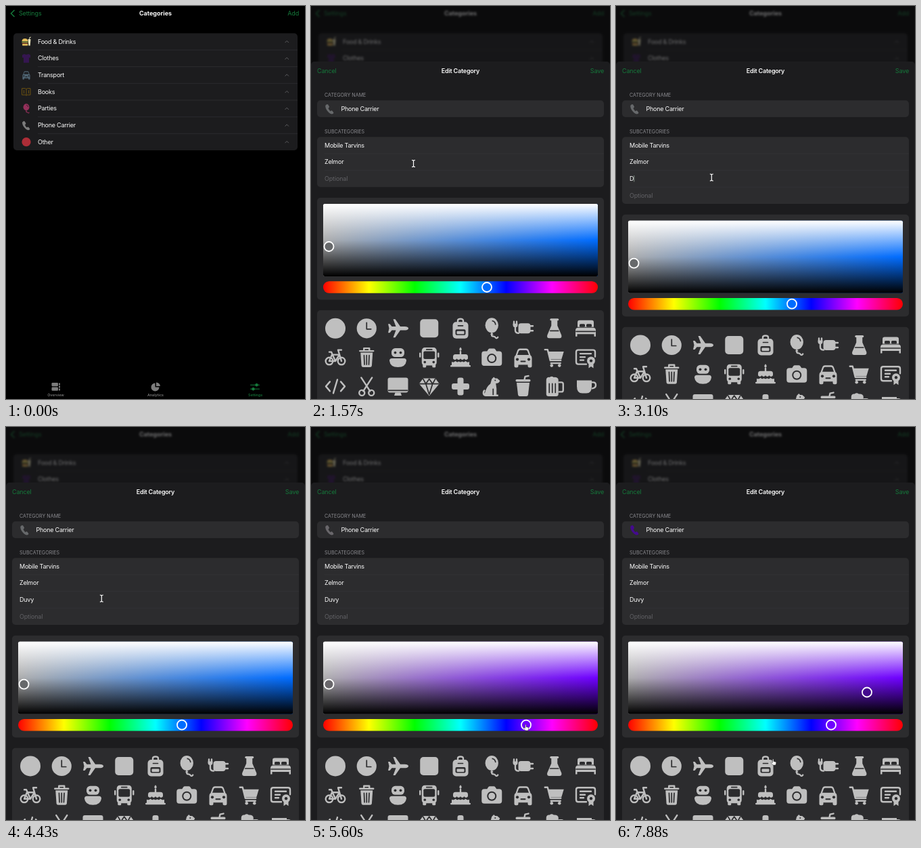
Write an HTML page that moves like this. It is 442 px wide and 580 px high and loops after 8000 ms.

```html
<!DOCTYPE html>
<html lang="en">
<head>
<meta charset="utf-8">
<title>Edit Category</title>
<style>
  html, body { margin: 0; width: 100%; height: 100%; overflow: hidden; background: #000; }
  svg { position: absolute; inset: 0; width: 100%; height: 100%; display: block; }
  text { font: 400 9px Inter, sans-serif; letter-spacing: -.24px; fill: #fafafa; }
  .title { font-weight: 700; letter-spacing: 0; }
  .sheetTitle { font-weight: 600; letter-spacing: -.22px; }
  .link { letter-spacing: -.15px; fill: #15793b; }
  .label { font-size: 7.1px; letter-spacing: .03px; fill: #8c8c91; }
  .hint { letter-spacing: -.15px; fill: #616165; }
  .tab { font-size: 5.4px; font-weight: 500; letter-spacing: 0; fill: #858585; }
  .active { fill: #15793b; }
  .mid { text-anchor: middle; }
  .end { text-anchor: end; }
  .icon { fill: currentColor; }
  .icon .cut { fill: var(--bg); }
  .line, .cutLine { fill: none; stroke-linecap: round; stroke-linejoin: round; }
  .icon .line { stroke: currentColor; stroke-width: 2.4; }
  .icon .cutLine { stroke: var(--bg); stroke-width: 1.7; }
  .thin .line { stroke-width: 1; }
  .knob { stroke: #fff; stroke-width: 1.8; }
</style>
</head>
<body>
<svg id="page" viewBox="0 0 442 580"></svg>
<svg id="front" viewBox="0 0 442 580"></svg>
<script>
const $ = id => document.getElementById(id);
const text = (x, y, str, cls = '') => `<text x="${x}" y="${y}" class="${cls}">${str}</text>`;
const path = (d, cls = '') => `<path d="${d}" class="${cls}"/>`;
const line = d => path(d, 'line');
const cutLine = d => path(d, 'cutLine');
const rect = (x, y, w, h, r = 0, cls = '') => `<rect x="${x}" y="${y}" width="${w}" height="${h}" rx="${r}" class="${cls}"/>`;
const dot = (x, y, r, cls = '', id = '') => `<circle id="${id}" cx="${x}" cy="${y}" r="${r}" class="${cls}"/>`;
const box = (x, y, w, h, fill, id = '') => `<rect id="${id}" x="${x}" y="${y}" width="${w}" height="${h}" rx="5" fill="${fill}"/>`;
const icon = (art, x, y, color, scale = 1, bg = '#2c2c2e') =>
  `<g class="icon" transform="translate(${x} ${y}) scale(${scale})" style="color:${color};--bg:${bg}">${art}</g>`;

const ROW = 24.68;
const CARD = '#2c2c2e', LIST_CARD = '#1c1c1e', GRAY = '#bfbfbf', TAB = '#7d7d7d', GREEN = '#15793b';

const phone = path('M-4.6-5.6q1.3-1.2 2.3 0l1.5 2.4q.5 1-.4 1.8l-.8.9q1 2.4 2.8 3.8l1-.6q1-.5 1.7.3l1.6 2q.6 1-.6 1.8-2.2 1.3-5.3-1.2-4.6-4-5.2-9 0-1.6 1.4-2.2z');
const car = path('M-13 13V1q0-3 2-4l2.5-7q1-3 4-3h9q3 0 4 3l2.5 7q2 1 2 4v12q0 2-2 2h-2q-2 0-2-2v-2h-14v2q0 2-2 2h-2q-2 0-2-2z')
  + path('M-8.5-3.5l2-5.5q.5-1.5 2-1.5h9q1.5 0 2 1.5l2 5.5z', 'cut')
  + dot(-8.5, 3, 2.1, 'cut') + dot(8.5, 3, 2.1, 'cut') + rect(-4, 5, 8, 2, 1, 'cut');
const balloon = '<ellipse cy="-4.5" rx="9.7" ry="11"/>' + path('M-2.5 9L0 5.5 2.5 9z')
  + line('M0 9c-1 4 4 2 5 4s3 2 4 0') + cutLine('M1-11q4 1 4.5 5');
const shirt = path('M-6-5l3-1.5q3 2 6 0L6-5v4H4v7.5h-8V-1h-2z');
const book = '<g class="thin">' + line('M-6-5h4.5L0-4l1.5-1H6V4.5H1.5L0 5.5l-1.5-1H-6zM0-4v9M-3.5-2v4M3.5-2v4') + '</g>';
const food = '<g fill="#e4bd5a">' + path('M-6.5-.5q.3-4 4.5-4t4.5 4z') + rect(-6, 3.5, 8.5, 2.5, 1) + '</g>'
  + '<g fill="#8a4f2c">' + rect(-6.5, 1.5, 9, 1.6, .8) + '</g><g fill="#8fae46">' + rect(-6.7, 0, 9.4, 1.2, .5)
  + '</g><g fill="#e8e2b8">' + path('M2.5-3.5h4L5.7 6H3.5z') + path('M4-4l.8-2.5 2-.5v1l-1.3.3L5-3.5z') + '</g>';

const icons = [
  dot(0, 0, 15),
  dot(0, 0, 14.6) + cutLine('M0-8.5V1H6.5'),
  path('M15.5 0c0 2-3 2.8-6 2.8H3.5L-4 13.5h-3L-3 2.8h-6l-3 3.7h-2.5L-13 0l-1.5-6.5h2.5l3 3.7h6L-7-13.5h3L3.5-2.8h6c3 0 6 .8 6 2.8z'),
  rect(-13.5, -13.5, 27, 27, 5),
  rect(-11.5, -9.5, 23, 24.5, 5) + line('M-4-9v-2.5q0-2.5 4-2.5t4 2.5V-9') + cutLine('M-3.5-4h7') + rect(-7.5, 1.5, 15, 8.5, 2, 'cut') + rect(-5.5, 4, 11, 4.5, 1),
  balloon,
  rect(-7, -7.5, 18, 15, 4) + line('M11-3.5h3.5M11 3.5h3.5M-13.5-10v3.5M-9.5-10v3.5M-11.5-3V3q0 4 5 4') + path('M-15-7h7v2q0 3.5-3.5 3.5T-15-5z'),
  rect(-6.5, -14.5, 13, 3, 1.5) + path('M-4.5-12V-4l-6 14q-1 4.5 3 4.5h15q4 0 3-4.5l-6-14v-8z') + cutLine('M-6 3.5H6'),
  path('M-12-2v-7q0-3 3-3H9q3 0 3 3v7z') + rect(-9, -6.5, 8, 4.5, 1.5, 'cut') + rect(1, -6.5, 8, 4.5, 1.5, 'cut') + path('M-15 12V3q0-4 4-4h22q4 0 4 4v9h-2.5V8.5h-25V12z') + cutLine('M-14 4.5h28'),
  dot(-9, 5.5, 5.3, 'line') + dot(9, 5.5, 5.3, 'line') + line('M-9 5.5L-5-4H6L0 5.5h-9M0 5.5L-6-8h-3M9 5.5L4-11h5'),
  line('M-10-9.5h20M-4-10v-3.5h8v3.5') + path('M-9-7H9L7.7 12q-.2 2.5-2.7 2.5h-10q-2.5 0-2.7-2.5z') + cutLine('M-3.8-3l.6 13.500M0-3v13.500M3.800-3l-.6 13.500'),
  rect(-9.5, -13.5, 19, 13, 5.5) + dot(-4, -7, 1.9, 'cut') + dot(4, -7, 1.9, 'cut') + path('M-12.5 5q0-3.5 3.5-3.5H9q3.5 0 3.5 3.5-1 9.5-12.5 9.5T-12.5 5z'),
  rect(-11, -14.5, 22, 26.5, 4.5) + rect(-8.5, -9, 17, 11.5, 2, 'cut') + cutLine('M-4-11.7h8') + dot(-6.5, 7, 1.8, 'cut') + dot(6.5, 7, 1.8, 'cut') + rect(-9.5, 10, 5, 5, 1.5) + rect(4.5, 10, 5, 5, 1.5) + line('M-13.5-6v5M13.5-6v5'),
  line('M0-8.5v4') + path('M0-15q3.5 4 0 5.5-3.5-1.5 0-5.5z') + path('M-11 2v-3q0-3.5 3.5-3.5h15Q11-4.5 11-1v3q-3 3.5-5.5 0-2.8 3.5-5.5 0-2.8 3.5-5.5 0-2.5 3.5-5.5 0z') + path('M-13 12V6.5q3 1.5 5.5-1 2.5 2.5 5 .5Q0 8 2.5 6q2.5 2 5-.5 2.5 2.5 5.5 1V12z') + rect(-15, 11.5, 30, 2.5, 1.2),
  path('M-11-9h4l2-3q.8-1 2-1h6q1.2 0 2 1l2 3h4q4 0 4 4V8.5q0 4-4 4h-22q-4 0-4-4V-5q0-4 4-4z') + dot(0, 1.5, 7, 'cut') + dot(0, 1.5, 5),
  car,
  line('M-14-11.5h4L-6 4.5H9.5M-5 8.5H9') + path('M-9.5-8.5h23.5L10.5 3H-6.5z') + dot(-4, 12, 2.3) + dot(7.5, 12, 2.3),
  line('M1 10h-12q-3 0-3-3V-8q0-3 3-3h22q3 0 3 3v7M-8-5.5H8M-8-.5h7M-8 4h5') + dot(8, 5, 6) + path('M4.5 9.5h7V16L8 13.5 4.5 16z') + dot(8, 5, 2.2, 'cut'),
  line('M-8-7l-6 7 6 7M8-7l6 7-6 7M3-10L-3 10'),
  line('M-8-13L5 7M8-13L-5 7') + dot(-7, 9.5, 4, 'line') + dot(7, 9.5, 4, 'line'),
  rect(-15, -13, 30, 22, 3) + cutLine('M-14 6h28') + path('M-4 9h8l1.5 4.5h-11z'),
  path('M-9-12H9l6 8L0 14-15-4z') + cutLine('M-14-3.8h28M-5-3.8L0 12 5-3.8 0-11-5-3.8M-9-11l4 7.2M9-11L5-3.8'),
  path('M-4.5-10q0-3 3-3h3q3 0 3 3v5.5H10q3 0 3 3v3q0 3-3 3H4.5V10q0 3-3 3h-3q-3 0-3-3V4.5H-10q-3 0-3-3v-3q0-3 3-3h5.5z'),
  path('M0-11l3-3 2 2h3l4 3.5q-1 4-6 4L7 3v9h2.5v2.5H-9q-4 0-4.5-4t2.5-6l1.500 1.500q-2 2-1 4.500Q-8 0-2-4z') + dot(5, -9, 1, 'cut') + cutLine('M2 4v8'),
  line('M2-10l1-4.5 5-1') + rect(-11, -10.5, 22, 3.5, 1.7) + path('M-9.5-5.5h19l-2 17.5q-.3 2.5-2.8 2.5h-9.4q-2.5 0-2.8-2.5z'),
  path('M-12-9q0-5 5-4.5 3-2.5 6 0 7-.5 7 4.5V11q0 3.5-3.5 3.5h-11Q-12 14.500-12 11z') + line('M7-6h3.5Q13-6 13-3.500v9Q13 8 10.500 8H7') + cutLine('M-7.5-4v13M-3-4v13M1.5-4v13'),
  path('M-13-9H9v9q0 10-8 10h-6q-8 0-8-10z') + line('M9-6h2q4 0 4 4t-5 5')
];

const categories = [
  ['Food &amp; Drinks', food, '#fff', 1], ['Clothes', shirt, '#351650', 1], ['Transport', car, '#4d6270', .43],
  ['Books', book, '#6d5210', 1], ['Parties', balloon, '#94305a', .46], ['Phone Carrier', phone, '#7c7c7c', 1],
  ['Other', icons[0], '#ad2d37', .44]
];

const listRows = categories.map(([name, art, color, scale], i) => {
  const y = 52.6 + ROW * i;
  return icon(art, 30, y, color, scale, LIST_CARD) + text(47, y + 3.1, name)
    + `<path d="M412.5 ${y + 1.5}l2.7-2.7 2.7 2.7" fill="none" stroke="#5c5c60"/>`
    + (i ? `<path d="M47 ${y - ROW / 2}H431" stroke="#323235" stroke-width=".7"/>` : '');
}).join('');

const overview = [-5.5, -1.5, 2.5].map(y => rect(4.5, y, 2, 3, .5)).join('')
  + rect(-6, -6, 9.5, 5.3, 1.2) + rect(-6, .5, 9.5, 5.3, 1.2);
const pie = path('M-.5-5.5V.5H5.5A6 6 0 1 1-.5-5.5z') + path('M1-6.5A6 6 0 0 1 7-1H1z');
const sliders = '<g class="thin">' + line('M-6.5-2.7h13M-6.5 3.2h13') + '</g>' + dot(2.5, -2.7, 2.2) + dot(-2.5, 3.2, 2.2);

$('page').innerHTML = `
  <rect width="442" height="580"/>
  <path d="M12.5 6L7.5 11l5 5" fill="none" stroke="${GREEN}" stroke-width="1.5"/>
  ${text(19, 14.4, 'Settings', 'link')}${text(221, 14.4, 'Categories', 'title mid')}${text(433, 14.4, 'Add', 'link end')}
  ${box(11, 40.3, 420, ROW * 7, LIST_CARD)}
  <rect id="press" x="11" y="${40.3 + 5 * ROW}" width="420" height="${ROW}" fill="#3a3a3c"/>
  ${listRows}
  ${icon(overview, 73.5, 562, TAB)}${text(73.5, 575.8, 'Overview', 'tab mid')}
  ${icon(pie, 221, 562, TAB)}${text(221, 575.8, 'Analytics', 'tab mid')}
  ${icon(sliders, 368, 562, GREEN)}${text(368.5, 575.8, 'Settings', 'tab mid active')}`;

const stops = Array.from({ length: 7 }, (_, i) => `<stop offset="${i / 6}" stop-color="hsl(${i * 60},100%,50%)"/>`).join('');
const rule = (y, id = '') => `<path id="${id}" d="M20 ${y}H433" stroke="#363639" stroke-width=".6"/>`;

$('front').innerHTML = `
  <defs>
    <linearGradient id="sat"><stop stop-color="#aeaeae"/><stop id="pure" offset="1"/></linearGradient>
    <linearGradient id="shade" x2="0" y2="1">
      <stop stop-color="#fff"/><stop offset=".5" stop-color="#fff" stop-opacity="0"/>
      <stop offset=".5" stop-opacity="0"/><stop offset="1"/>
    </linearGradient>
    <linearGradient id="hues">${stops}</linearGradient>
  </defs>
  <g id="sheet">
    ${box(0, 82, 442, 520, '#1c1c1e')}
    ${text(9, 98.7, 'Cancel', 'link')}${text(221, 98.7, 'Edit Category', 'sheetTitle mid')}${text(433, 98.7, 'Save', 'link end')}
    ${text(20, 133.8, 'CATEGORY NAME', 'label')}
    ${box(9, 139.2, 424, ROW, CARD)}
    <g id="phone">${icon(phone, 27.7, 151.6, 'currentColor', 1.08)}</g>
    ${text(44.5, 154.7, 'Phone Carrier')}
    ${text(20, 187.7, 'SUBCATEGORIES', 'label')}
    ${box(9, 193.2, 424, 0, CARD, 'subcard')}
    ${rule(193.2 + ROW)}${rule(193.2 + 2 * ROW)}${rule(193.2 + 3 * ROW, 'lastRule')}
    ${text(20, 208.5, 'Mobile Tarvins')}${text(20, 233.2, 'Zelmor')}
    <text id="typed" x="20" y="257.9"></text>
    <path id="caret" stroke="#8a9a8e" stroke-width=".9"/>
    <text id="hint" x="20" class="hint">Optional</text>
    <g id="lower">
      ${box(9, 283, 424, 150.5, CARD)}
      <rect x="18" y="292" width="406" height="107" rx="2.5" fill="url(#sat)"/>
      <rect x="18" y="292" width="406" height="107" rx="2.5" fill="url(#shade)"/>
      <rect x="18" y="406.3" width="406" height="17.5" rx="8.7" fill="url(#hues)"/>
      ${dot(0, 0, 7, 'knob', 'toneKnob')}${dot(0, 415, 7, 'knob', 'hueKnob')}
      ${box(9, 449, 424, 160, CARD)}
      ${icons.map((art, i) => icon(art, 36 + 46.25 * (i % 9), 475.8 + 42.8 * Math.floor(i / 9), GRAY)).join('')}
    </g>
  </g>
  <g id="pointer">
    <path id="beam" d="M-2.5-5Q0-5 0-3.5 0-5 2.5-5M0-4V4M-2.5 5Q0 5 0 3.5 0 5 2.5 5" fill="none" stroke="#fff" stroke-width="1.2"/>
    <path id="hand" d="M-1.5-3.5q.8-1 1.5 0V-.5l3 .7q1 .4.8 1.5L3 5H-1L-3.7 1.6q0-1.2 1.1-.9l1.1.8z" fill="#fff" stroke="#222" stroke-width=".5"/>
    <path id="cross" d="M-3 0H3M0-3V3" stroke="#1a0630" stroke-width=".6"/>
  </g>`;

const clamp = v => Math.min(1, Math.max(0, v));
const ramp = (t, from, to) => { const p = clamp((t - from) / (to - from)); return p * p * (3 - 2 * p); };

// Pointer route: time, x, y
const route = [
  [1300, 158, 214], [1570, 151.5, 232.5], [1680, 151.5, 232.5], [2400, 141.3, 253], [4430, 141.3, 253],
  [4760, 260, 441], [4800, 260, 441], [5170, 318, 443], [5600, 318, 443], [5950, 350, 366],
  [6370, 368, 389], [6790, 371, 391.5], [6960, 371, 391.5], [7690, 232, 492], [7880, 233, 494]
];
function pointerAt(t) {
  let [, x, y] = route[0];
  for (let i = 1; i < route.length; i++) {
    const [from, x0, y0] = route[i - 1], [to, x1, y1] = route[i];
    if (t < from) break;
    const p = ramp(t, from, to);
    x = x0 + (x1 - x0) * p;
    y = y0 + (y1 - y0) * p;
  }
  return [x, y];
}

const show = (id, on) => $(id).style.display = on ? '' : 'none';
const set = (id, attrs) => { for (const k in attrs) $(id).setAttribute(k, attrs[k]); };
const WORD = 'Duvy', KEYS = [2940, 3300, 3500, 3830];

function draw(t) {
  const rise = 1 - (1 - clamp((t - 880) / 520)) ** 3;
  const grow = ramp(t, 2940, 3090);
  const sag = .7 * (ramp(t, 6370, 6900) - ramp(t, 6970, 7300));

  set('press', { opacity: .8 * (ramp(t, 340, 570) - rise) });
  $('page').style.filter = rise ? `blur(${1.8 * rise}px) brightness(${1 - .28 * rise})` : 'none';
  $('front').style.background = `rgba(26,26,28,${.45 * rise})`;
  set('sheet', { transform: `translate(0 ${500 * (1 - rise) + sag})` });

  const typed = WORD.slice(0, KEYS.filter(k => t >= k).length);
  $('typed').textContent = typed;
  set('subcard', { height: ROW * (3 + grow) });
  set('lastRule', { opacity: grow });
  set('hint', { y: 257.9 + ROW * grow });
  const caretX = 20.5 + (typed ? $('typed').getComputedTextLength() : 0);
  set('caret', { d: `M${caretX} 250V259.5` });
  show('caret', t >= 2400 && t < 4430);
  set('lower', { transform: `translate(0 ${ROW * grow})` });

  const [px, py] = pointerAt(t);
  const hueX = 260 + 58 * ramp(t, 4800, 5170);
  const hue = (hueX - 18) / 406 * 360;
  const [toneX, toneY] = t < 5950 ? [26.5, 355] : pointerAt(Math.min(t, 6960)).map((v, i) => v - ROW * i);
  const tone = `hsl(${hue},${(toneX - 18) / 4.06}%,${(399 - toneY) / 1.07}%)`;
  const pure = `hsl(${hue},100%,50%)`;
  set('pure', { 'stop-color': pure });
  set('hueKnob', { cx: hueX, fill: pure });
  set('toneKnob', { cx: toneX, cy: toneY, fill: tone });
  $('phone').style.color = tone;

  show('pointer', t >= 1300);
  set('pointer', { transform: `translate(${px} ${py})` });
  const overTone = t > 5600 && py > 316 && py < 424;
  show('beam', py < 292);
  show('cross', overTone);
  show('hand', py >= 292 && !overTone);
}

const start = performance.now();
function frame() {
  draw((performance.now() - start) % 8000);
  requestAnimationFrame(frame);
}
frame();
</script>
</body>
</html>
```
